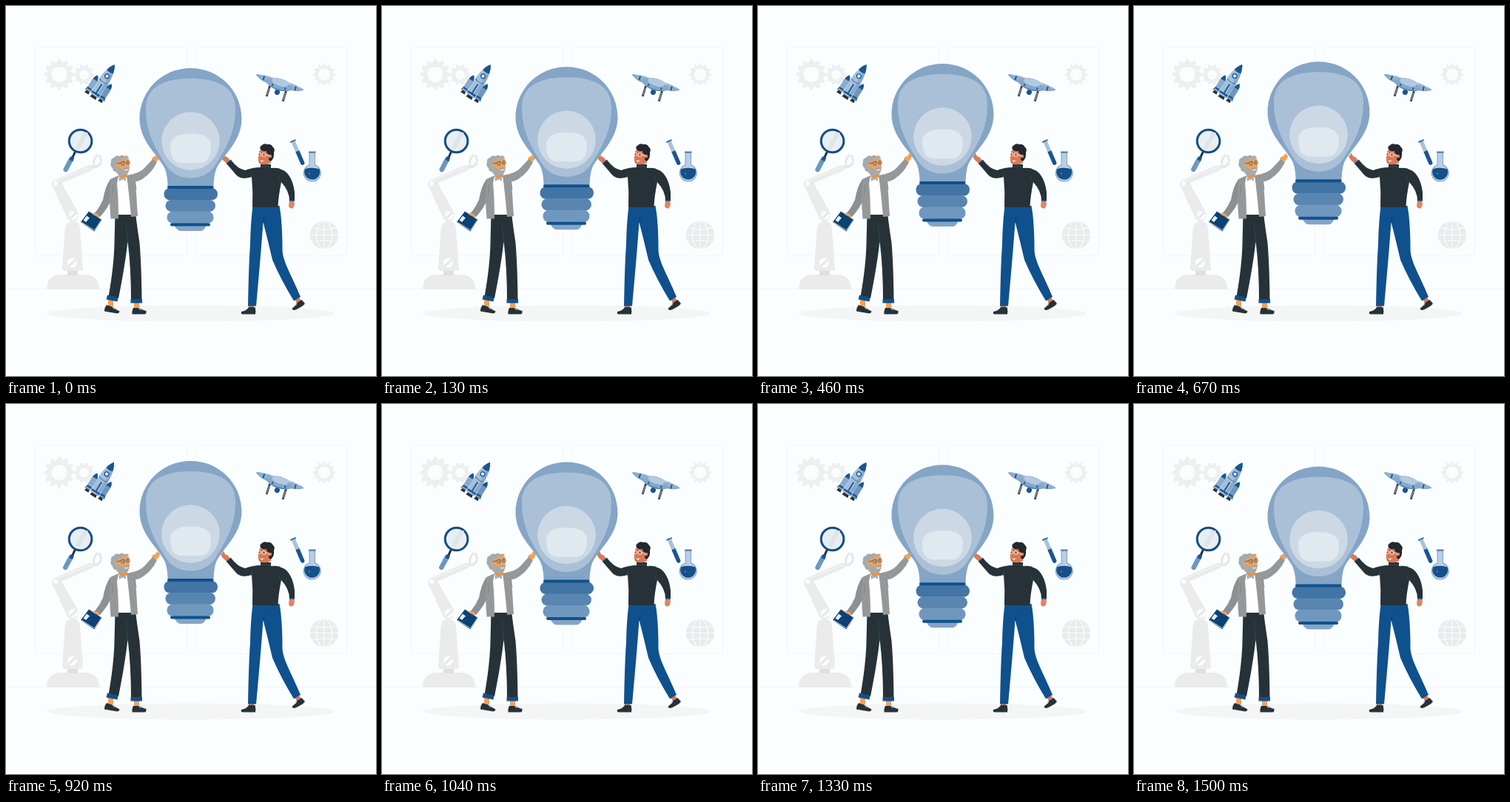
Recreate the animation shown at these times as an HTML page. Size 500 px wide and 500 px high, loop 1540 ms.

```html
<!DOCTYPE html>
<html lang="en">
<head>
<meta charset="utf-8">
<title>Big idea</title>
<style>
html, body { margin: 0; width: 100%; height: 100%; overflow: hidden; background: #fbfeff; }
svg { display: block; width: 100vw; height: 100vh; }
</style>
</head>
<body>
<svg viewBox="0 0 500 500">
  <g id="room">
    <g fill="#fbfeff" stroke="#f4f7f8">
      <rect x="39.5" y="55.5" width="205" height="282" rx="1"/>
      <rect x="257.5" y="55.5" width="203" height="282" rx="1"/>
    </g>
    <path d="M0 382.5H500" stroke="#f1f5f6"/>
    <ellipse cx="250" cy="415.5" rx="194" ry="11" fill="#f4f5f5"/>
    <g id="gears" fill="#eeefef" fill-rule="evenodd"></g>
    <circle cx="430" cy="309.5" r="19" fill="#e9eaea"/>
    <g fill="none" stroke="#fbfeff" stroke-width="1.1">
      <path d="M430 290v39M411 309.5h38M414 300q16 4 32 0M414 319q16-4 32 0"/>
      <ellipse cx="430" cy="309.5" rx="10.5" ry="19"/>
    </g>
  </g>

  <g id="robot" fill="#ebebeb">
    <path d="M55 383q0-20 21-20h29q21 0 21 20z"/>
    <path d="M83 356h14v8H83z" fill="#dedfdf"/>
    <path d="M79.500 302Q80 291 90 291T100 302L104 354q0 4-4 4H80q-4 0-4-4z"/>
    <path d="M62 242Q60 236 67 235Q73 235 75 239L97 278Q99 284 96 289Q90 294 84 289z"/>
    <path d="M63 236L112 215Q117 214 118 217T116 222L69 242z"/>
    <path d="M62 238L113 218" stroke="#fbfeff" stroke-width=".7"/>
    <path d="M117 217Q123 219 127 214Q130 208 126 201M119 216Q117 207 124 201" fill="none" stroke="#e6e7e7" stroke-width="3"/>
    <g fill="#fafdfd">
      <circle cx="89.500" cy="347" r="6.500"/><circle cx="91" cy="283" r="6"/><circle cx="67" cy="240" r="3"/>
    </g>
    <path d="M85 351l9-8M87 287l8-8" stroke="#e6e7e7" stroke-width="3"/>
  </g>

  <g id="rocket">
    <g transform="translate(130 105) rotate(33) scale(.93)">
      <path d="M-8-1L-17 20H-8zM8-1L17 20H8z" fill="#1a5590"/>
      <path d="M-15.500 20V3Q-15-4-12-7Q-8.500-4-8 3V20z" fill="#8aacce"/>
      <path d="M8 20V3Q8.500-4 12-7Q15-4 15.500 3V20z" fill="#6d97c0"/>
      <path d="M-15.400 1Q-15-4-12-7Q-8.500-4-8 1zM8 1Q8.500-4 12-7Q15-4 15.400 1zM-15.500 15h7.500v2.500h-7.500zM8 15h7.500v2.500H8z" fill="#1a5590"/>
      <path d="M-14 20h5l1 4h-7zM9 20h5l1 4H8zM-4 20h8l1 5H-5z" fill="#263238"/>
      <path d="M-6.500 21Q-9-3-7-14Q-5-27 0-33Q5-27 7-14Q9-3 6.500 21z" fill="#a3bfdb"/>
      <path d="M2 21Q5-8 0-33Q5-27 7-14Q9-3 6.500 21z" fill="#86a9cb"/>
      <path d="M-5.500-21Q-3.500-29 0-33Q3.500-29 5.500-21Q0-18-5.500-21z" fill="#1a5590"/>
      <path d="M-7 16h14v2.500H-7zM-1 1h2v17h-2z" fill="#1a5590"/>
      <path d="M-7-4q7 3 14 0" fill="none" stroke="#3d70a2"/>
      <circle cy="-13" r="3.200" fill="#d7e3ee" stroke="#1a5590" stroke-width="1.500"/>
    </g>
  </g>

  <g id="drone">
    <g transform="translate(370 105) rotate(17)">
      <path d="M-12 7V21.500M11 7V21.500" stroke="#263238" stroke-width="2.800"/>
      <path d="M-12 9V20M11 9V20" stroke="#a9b7c0" stroke-width=".9"/>
      <circle cy="12" r="3.600" fill="#1a5590"/>
      <path d="M-34-2Q-22-6-12-5Q0-9 12-5Q24-5 33-1Q28 3 18 4Q10 9 0 9Q-10 9-18 4Q-28 3-34-2z" fill="#84a8ca"/>
      <path d="M-15-4Q0-9 15-4Q10 3 0 3T-15-4z" fill="#b2c9df"/>
      <path d="M-14 6Q0 9 14 6Q8 9 0 9T-14 6z" fill="#4d7eac"/>
      <ellipse cx="-22" cy="-2.500" rx="12" ry="2.200" fill="#9ebad5"/>
      <ellipse cx="22" cy="-1.500" rx="11" ry="2.400" fill="#9ebad5"/>
      <path d="M-34-2h23M11-1h22" stroke="#6e98bf" stroke-width=".8"/>
      <path d="M-23-4v6M22-3v6M-9 3v3M9 3v3" stroke="#1a5590" stroke-width="1.800"/>
    </g>
  </g>

  <g id="lens">
    <path d="M94 196L89 207" stroke="#263238" stroke-width="3"/>
    <path d="M87.800 207.500L80.800 221" stroke="#6c97c0" stroke-width="6.500" stroke-linecap="round"/>
    <path d="M90 204L88 209" stroke="#1a5590" stroke-width="5"/>
    <circle cx="100.600" cy="182.500" r="15.300" fill="#e9eef1" stroke="#114d88" stroke-width="3"/>
    <path d="M94 192L105 171h6L99 194z" fill="#dfe4e7"/>
  </g>

  <g id="lab">
    <g transform="translate(387.800 182.500) rotate(-23.500)">
      <path d="M-2.700 0H2.700V32Q2.700 35 0 35T-2.700 32z" fill="#a9c2da"/>
      <path d="M-2.700 15H2.700V32Q2.700 35 0 35T-2.700 32z" fill="#1a5590"/>
      <path d="M-4 0H4" stroke="#3d70a2" stroke-width="2"/>
    </g>
    <g transform="translate(0 -.8)">
      <path d="M410 199h7.500v16.500A11.500 11.500 0 1 1 410 215.500z" fill="#b9cee1"/>
      <path d="M404 221Q414 218 423.500 221A10.500 10.500 0 1 1 404 221z" fill="#145089"/>
      <path d="M410 199h7.500v16.500A11.500 11.500 0 1 1 410 215.500z" fill="none" stroke="#7da2c6"/>
      <path d="M409 198.300h9.500" stroke="#4d7eac" stroke-width="2"/>
      <circle cx="410" cy="227" r="1.200" fill="#4d7eac"/>
    </g>
  </g>

  <g id="elder">
    <path d="M197 207Q198 203 202 203L204 199.500Q206 199 206 201L208 202Q208 207 202 211z" fill="#f5a057"/>
    <path d="M119 280Q118 287 122 288L128 283 126 277z" fill="#f5a057"/>
    <path d="M138 396h7v10h-7zM173 400h7v9h-7z" fill="#f5a057"/>
    <path d="M136 404L145 407Q149 411 153.500 412.500Q153 415.500 150 415.500L133 412.500Q133 407 136 404zM172 408H180Q185 411 189.500 412Q190 416.500 187 416.500H170.500Q170 411 172 408z" fill="#263238"/>
    <path d="M144 407l3 3M179 408l4 3" stroke="#d8dfe2"/>
    <path d="M147.500 280H175Q177 297 180.500 320Q183 350 183.500 398H169Q169 354 164.500 318Q161 350 152 395L138.500 393Q146 350 146.500 320z" fill="#263238"/>
    <path d="M164.500 320L162 293" stroke="#3c484e" stroke-width=".8"/>
    <path d="M137 390.500L151.500 394 150.500 399.500 135.500 396.500zM168.500 396H184V401.500H168.500z" fill="#0f518c"/>
    <path d="M149 230L168 228 172 282H149z" fill="#fff"/>
    <path d="M141 234Q134 244 131 262Q127 271 120 280L127 285Q138 273 143 260z" fill="#8d9092"/>
    <path d="M152 229L141 234Q139 261 141.500 287.500H152Q152 258 150 240z" fill="#959899"/>
    <path d="M163 229Q181 226 187 219L198 207 204 211Q197 225 188 231Q181 237 175 237L178 284 169 285Q166 250 163 229z" fill="#959899"/>
    <path d="M174 237Q175 242 176 248M143 256Q145 248 144 242" fill="none" stroke="#7c8082" stroke-width=".8"/>
    <path d="M154 223H164V231L158 235 152 230z" fill="#e99249"/>
    <path d="M152 231L158 233 162 230V237L158 234 153 237z" fill="#aeb3b5"/>
    <path d="M149 207Q157 203 166 206L167 218Q167 226 159 226Q150 224 149 207z" fill="#f5a057"/>
    <path d="M166 204Q164 201 160 203Q157 200 153 203Q148 201 146 205Q141 206 142 211Q140 216 144 219Q144 224 149 224Q150 229 157 229L164 227Q167 223 166 218Q162 216 158 220Q154 221 153 215L151 210Q156 209 157 206Q162 208 166 204z" fill="#a8aaaa"/>
    <circle cx="151" cy="215" r="2.200" fill="#f5a057"/>
    <path d="M160 221.500q3 1 5-.5" fill="none" stroke="#fff"/>
    <g fill="none" stroke="#1a5590" stroke-width=".8">
      <circle cx="158" cy="212.500" r="2.600"/><circle cx="165" cy="211.500" r="2.300"/><path d="M150 213L155 212"/>
    </g>
    <path d="M158 212h.8M164.500 211.500h.8" stroke="#263238" stroke-width="1.300"/>
    <path d="M112 277.500L129.500 289 119.500 304.500 101 292z" fill="#0c4173"/>
    <path d="M129 289L119.500 303 102 292" fill="none" stroke="#e7edf0" stroke-width=".8"/>
    <path d="M109 283.500L113 286.500 108 292 104.500 289.500z" fill="#e8eff5"/>
    <path d="M119 281L124 283" stroke="#f5a057" stroke-width="3" stroke-linecap="round"/>
  </g>

  <g id="youth">
    <path d="M303 210Q301 204 296 203L294 199Q292 199 292.500 202L290 202Q291 208 299 213z" fill="#d97a59"/>
    <path d="M383 262H389Q391 269 388 273Q383 275 382 270z" fill="#e38361"/>
    <path d="M328 402h7v8h-7zM389 395l6-3 5 8-5 4z" fill="#d97a59"/>
    <path d="M328 407H336.500Q338 412 337 416.500H320Q317 416.500 318 413Q325 412 328 407zM392 402L399.500 397Q402 400 404 402Q402 406 390 411Q386 411 387 408Q391 406 392 402z" fill="#263238"/>
    <path d="M326 409l-3 2M393 402l-2 3" stroke="#d8dfe2"/>
    <path d="M333.500 270H369.500Q373.500 291 373.500 330C374 345 386 364 398 393L389 398.500Q371 369 360 343Q354 317 347.500 292Q345 329 338 405.500H327Q328 350 330 322Q330.500 293 333.500 270z" fill="#0f518c"/>
    <path d="M347.500 293L349 283" stroke="#0a3d6c" stroke-width=".8"/>
    <path d="M344 214H358V219Q368 218 372 221C381 223 388.500 236 390 252V263H383Q383 250 372 238Q368 257 367.500 272H333Q334 251 332 231Q317 236 310 227L298 213 304 208Q313 220 323 222Q334 218 344 218z" fill="#263238"/>
    <path d="M332 232V226M372 238Q369 235 368 231M345 217H358" fill="none" stroke="#455158" stroke-width=".7"/>
    <path d="M298 213L304 208M383 263H390" stroke="#1a5590" stroke-width="1.500"/>
    <path d="M343 195Q349 191 357 195L358 212Q354 215 346 214Q341 214 341 208Q340 203 343 195z" fill="#d97a59"/>
    <path d="M344 194Q342 190 346 188Q349 185 353 187Q358 186 361 191Q364 193 362 198Q363 205 358 210L355 208 356 201Q352 200 352 196Q347 197 344 194z" fill="#22282d"/>
    <circle cx="357" cy="203" r="2.300" fill="#d97a59"/>
    <path d="M343 208q3 2 6 0l-3 3z" fill="#fff"/>
    <g fill="none" stroke="#f4f7f8" stroke-width=".8">
      <circle cx="348.500" cy="201" r="2.600"/><circle cx="342.500" cy="200.500" r="2"/><path d="M351 201L357 203"/>
    </g>
    <path d="M348 201h.8M342.500 200.500h.7" stroke="#263238" stroke-width="1.300"/>
  </g>

  <g id="bulb">
    <path d="M249.500 84.500C288 84.500 318.500 115 318.500 153C318.500 184 292 203 284 221C281 230 281 238 280.500 245H218.500C218.500 238 218 230 215 221C207 203 180.500 184 180.500 153C180.500 115 211 84.500 249.500 84.500z" fill="#84a5c5"/>
    <path d="M249.500 98.500C281 98.500 310 107 310 139C310 174 296 194 284 214Q272 233 249.500 233T215 214C203 194 189 174 189 139C189 107 218 98.500 249.500 98.500z" fill="#aac0d7"/>
    <circle cx="249.500" cy="183" r="39.300" fill="#ccd9e5"/>
    <path d="M249.500 173Q277 173 277 190Q277 212.500 262 212.500H237Q222 212.500 222 190Q222 173 249.500 173z" fill="#e0e8f0"/>
    <rect x="213.500" y="246.500" width="72.500" height="16.500" rx="8" fill="#4274a4"/>
    <rect x="215.500" y="262.500" width="67.500" height="16" rx="8" fill="#5985b1"/>
    <rect x="217.500" y="278" width="63" height="16.500" rx="8" fill="#7098be"/>
    <path d="M227 296H271Q268 304.500 263 304.500H236Q231 304.500 227 296z" fill="#84a5c5"/>
    <rect x="218" y="243.500" width="62.500" height="4" rx="2" fill="#0f518c"/>
    <rect x="222" y="294" width="54" height="4" rx="2" fill="#0f518c"/>
  </g>
</svg>
<script>
const LOOP = 1540, LIFT = 10, LEAD = 40;
const $ = id => document.getElementById(id);

function gear(x, y, r, hole, teeth) {
  const n = teeth * 4;
  let d = '';
  for (let i = 0; i < n; i++) {
    const a = (i - 0.5) / n * 2 * Math.PI;
    const k = i % 4 < 2 ? r : r * 0.8;
    d += (i ? 'L' : 'M') + (x + k * Math.cos(a)).toFixed(2) + ' ' + (y + k * Math.sin(a)).toFixed(2);
  }
  d += `zM${x - hole} ${y}a${hole} ${hole} 0 1 0 ${2 * hole} 0a${hole} ${hole} 0 1 0 ${-2 * hole} 0z`;
  return `<path d="${d}"/>`;
}
$('gears').innerHTML = gear(72, 92.5, 21, 10.5, 12) + gear(105.5, 93, 14, 6.5, 10) + gear(430, 92.5, 15, 8, 12);

const sway = (id, deg, x, y) => $(id).setAttribute('transform', `rotate(${deg.toFixed(3)} ${x} ${y})`);

function draw(ms) {
  const t = ms % LOOP;
  const p = (t + LEAD) % LOOP / LOOP;
  const rise = 1 - Math.abs(2 * p - 1);
  $('bulb').setAttribute('transform', `translate(0 ${(-LIFT * rise).toFixed(3)})`);
  // The small props lean almost imperceptibly
  const lean = (1 - Math.cos(2 * Math.PI * (t - 150) / LOOP)) / 2;
  sway('rocket', -lean, 119, 126);
  sway('drone', 0.4 * lean, 370, 105);
  sway('lens', 0.7 * lean, 100, 182);
  sway('lab', 0.4 * lean, 408, 215);
}

const start = performance.now();
function tick() {
  draw(performance.now() - start);
  requestAnimationFrame(tick);
}
draw(0);
requestAnimationFrame(tick);
</script>
</body>
</html>
```
